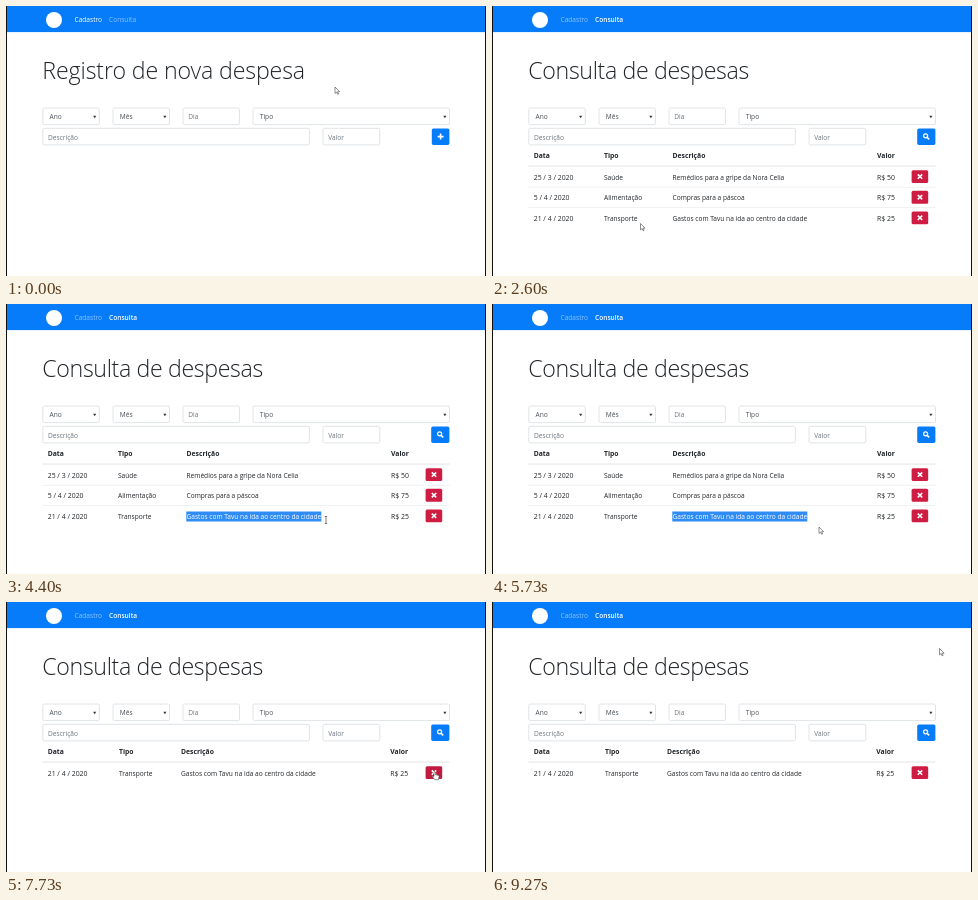
An HTML page that plays this animation: 480x270 px, repeating every 9.54 s.

```html
<!DOCTYPE html>
<html lang="pt">
<head>
<meta charset="utf-8">
<title>Despesas</title>
<style>
html, body { margin: 0; width: 100%; height: 100%; overflow: hidden; background: #fff; }
svg { display: block; width: 480px; height: 270px; }
text { font: 6.6px "Open Sans", "Noto Sans", sans-serif; fill: #212529; white-space: pre; }
.title { font-size: 23.2px; font-weight: 300; letter-spacing: -.13px; }
.tight { letter-spacing: -.36px; }
.nav { font-size: 6.6px; fill: #fff; }
.head { font-size: 6.8px; font-weight: 700; }
.num { font-size: 6.9px; }
.choice { fill: #495057; }
.hint { fill: #6c757d; }
.field { fill: #fff; stroke: #d9dde1; stroke-width: .8; }
.rule { fill: #dee2e6; }
.blue { fill: #067cfb; }
.icon { fill: none; stroke: #fff; stroke-width: 1.6; }
.pointer { fill: #fff; stroke: #444; stroke-width: .6; stroke-linejoin: round; }
</style>
</head>
<body>
<svg viewBox="0 0 480 270">
  <defs><clipPath id="clip"><rect id="clipBox" x="180" y="205" width="0" height="16"/></clipPath></defs>
  <rect width="480" height="270" fill="#fff"/>
  <rect class="blue" width="480" height="26.1"/>
  <path d="M.5 0V270M479.5 0V270" stroke="#111"/>
  <circle cx="48" cy="14" r="8" fill="#fff"/>
  <text class="nav" id="navAdd" x="68.5" y="16.4">Cadastro</text>
  <text class="nav" id="navList" x="103" y="16.4">Consulta</text>
  <g id="form"></g>
  <g id="page"></g>
  <g id="selection">
    <rect id="mark" x="180.3" y="207.5" height="10" fill="#2f8cf5"/>
    <g clip-path="url(#clip)"><text id="marked" x="180.5" y="214.8" style="fill:#fff"></text></g>
  </g>
  <g id="cursor">
    <path id="arrow" class="pointer" d="M0 0V6.4L1.6 5 2.6 7.3 3.6 6.9 2.6 4.7H4.6Z"/>
    <path id="hand" class="pointer" d="M0 .6Q.7 -.4 1.4 .6V3.2L4.4 3.8Q5.3 4.1 5.1 5.2L4.5 8.2H.8L-1.6 5.2Q-1.5 4.2 0 4.9Z"/>
    <path id="beam" d="M-1.2 -3.5H1.2M0 -3.5V3.5M-1.2 3.5H1.2" fill="none" stroke="#444" stroke-width=".7"/>
  </g>
</svg>
<script>
const LOOP = 9540, STEP = 1000 / 15;
const $ = id => document.getElementById(id);

const rows = [
  ["25 / 3 / 2020", "Saúde", "Remédios para a gripe da Nora Celia", "R$ 50"],
  ["5 / 4 / 2020", "Alimentação", "Compras para a páscoa", "R$ 75"],
  ["21 / 4 / 2020", "Transporte", "Gastos com Tavu na ida ao centro da cidade", "R$ 25"]
];
const heads = ["Data", "Tipo", "Descrição", "Valor"];
const wideCols = [41.7, 112, 180.5, 385], slimCols = [41.7, 113, 175, 384.3];

// time, x, y, shape from that time on
const path = [
  [0, 329, 81, "arrow"],
  [400, 152, 23, "arrow"],
  [467, 129, 15, "hand"],
  [533, 122.5, 12.5, "hand"],
  [867, 122.5, 12.5, "hand"],
  [933, 123, 12.5, "hand"],
  [1533, 123, 12.5, "hand"],
  [1733, 122, 30, "arrow"],
  [2133, 119, 140, "arrow"],
  [2533, 120, 216, "arrow"],
  [2600, 148.5, 217.5, "arrow"],
  [2867, 194, 214, "beam"],
  [3267, 181, 215, "beam"],
  [3533, 181, 215, "beam"],
  [3800, 242, 216, "beam"],
  [4400, 320, 216, "beam"],
  [4600, 320, 216, "beam"],
  [4733, 321.5, 222, "arrow"],
  [4867, 321.5, 222, "arrow"],
  [5000, 323, 222, "arrow"],
  [5333, 323, 222, "arrow"],
  [5733, 327, 223, "arrow"],
  [5933, 327, 223, "arrow"],
  [6333, 414, 178, "arrow"],
  [6400, 422, 172, "hand"],
  [6533, 428, 169.5, "hand"],
  [8200, 428, 169.5, "hand"],
  [8333, 430, 160, "arrow"],
  [8733, 441, 98, "arrow"],
  [9200, 446.8, 47.5, "arrow"],
  [9267, 447.5, 46.5, "arrow"],
  [LOOP, 447.5, 46.5, "arrow"]
];

const text = (x, y, s, cls = "") => `<text class="${cls}" x="${x}" y="${y}">${s}</text>`;
const box = (x, y, w, h, cls, r = 1.6) => `<rect class="${cls}" x="${x}" y="${y}" width="${w}" height="${h}" rx="${r}"/>`;

function field(x, y, w, label, isSelect) {
  const arrow = isSelect ? `<path d="M${x + w - 6.2} 109.8h3.2l-1.6 2.5z" fill="#343a40"/>` : "";
  return box(x, y, w, 16.6, "field") +
    text(x + (isSelect ? 6.8 : 5.2), y + 11.2, label, isSelect ? "choice" : "hint") + arrow;
}

$("form").innerHTML =
  field(36.8, 102, 56.5, "Ano", true) + field(107, 102, 56.5, "Mês", true) +
  field(177, 102, 56.5, "Dia") + field(247, 102, 196.5, "Tipo", true) +
  field(36.8, 122.3, 266.6, "Descrição") + field(317, 122.3, 56.8, "Valor");

function deleteButton(y, hover) {
  return `<rect x="419.6" y="${y - 6.4}" width="16.6" height="12.9" rx="1.5" fill="${hover ? "#c01a3e" : "#cf1c42"}"/>` +
    `<path class="icon" d="M425.8 ${y - 2.2}l4.4 4.4m0-4.4l-4.4 4.4"/>`;
}

function addPage() {
  return text(36.3, 73, "Registro de nova despesa", "title") +
    box(425.8, 122.4, 17.6, 16.5, "blue") + `<path class="icon" d="M431.6 130.6h6m-3-3v6"/>`;
}

function listPage(gone, hover) {
  const cols = gone > 1 ? slimCols : wideCols;
  const cells = (list, y, cls) => list.map((s, i) => text(cols[i], y, s, cls || (i % 3 ? "" : "num"))).join("");
  let out = text(36.3, 72.8, "Consulta de despesas", "title tight") +
    box(425.2, 122.4, 18.2, 16.5, "blue") +
    `<circle class="icon" cx="433.6" cy="129.8" r="2" style="stroke-width:1.2"/><path class="icon" d="M435 131.2l2.2 2.2"/>` +
    cells(heads, 152.4, "head") + box(36.5, 159.6, 407, .9, "rule", 0);
  rows.slice(gone).forEach((row, i) => {
    const y = 170.6 + i * 20.6;
    if (i) out += box(36.5, y - 10.3, 407, .5, "rule", 0);
    out += cells(row, y + 2.9) + deleteButton(y, hover && !i);
  });
  return out;
}

let shown = "";
function drawPage(t) {
  const listing = t >= 1066;
  const gone = t < 6999 ? 0 : t < 7532 ? 1 : 2;
  const hover = t >= 6399 && t < 6999 || t >= 7266 && t < 7532 || t >= 7666 && t < 8266;
  const key = [listing, gone, hover].join();
  if (key === shown) return;
  shown = key;
  $("page").innerHTML = listing ? listPage(gone, hover) : addPage();
  $("navAdd").style.fillOpacity = listing ? .55 : 1;
  $("navList").style.fontWeight = listing ? 600 : 400;
}

function cursorAt(t) {
  const i = Math.max(0, path.findIndex(p => p[0] > t + 1) - 1);
  const [t0, x0, y0, shape] = path[i], [t1, x1, y1] = path[i + 1];
  const k = Math.max(0, Math.min(1, (t - t0) / (t1 - t0)));
  return { x: x0 + (x1 - x0) * k, y: y0 + (y1 - y0) * k, shape };
}

$("marked").textContent = rows[2][2];

function drawSelection(t, x) {
  const on = t >= 3599 && t < 5799;
  const full = $("marked").getComputedTextLength() + .4;
  const w = !on ? 0 : t >= 4399 ? full : Math.max(0, Math.min(full, x - 187));
  $("mark").setAttribute("width", w);
  $("clipBox").setAttribute("width", w + .3);
  $("selection").style.display = w ? "" : "none";
}

function render(now) {
  const t = Math.floor((now % LOOP + 5) / STEP) * STEP;
  const c = cursorAt(t);
  drawPage(t);
  drawSelection(t, c.x);
  $("navList").style.fillOpacity = t >= 1066 ? 1 : t >= 466 ? .75 : .55;
  $("cursor").setAttribute("transform", `translate(${c.x} ${c.y})`);
  for (const id of ["arrow", "hand", "beam"]) $(id).style.display = id === c.shape ? "" : "none";
}

const start = performance.now();
function tick() {
  render(performance.now() - start);
  requestAnimationFrame(tick);
}
tick();
</script>
</body>
</html>
```
